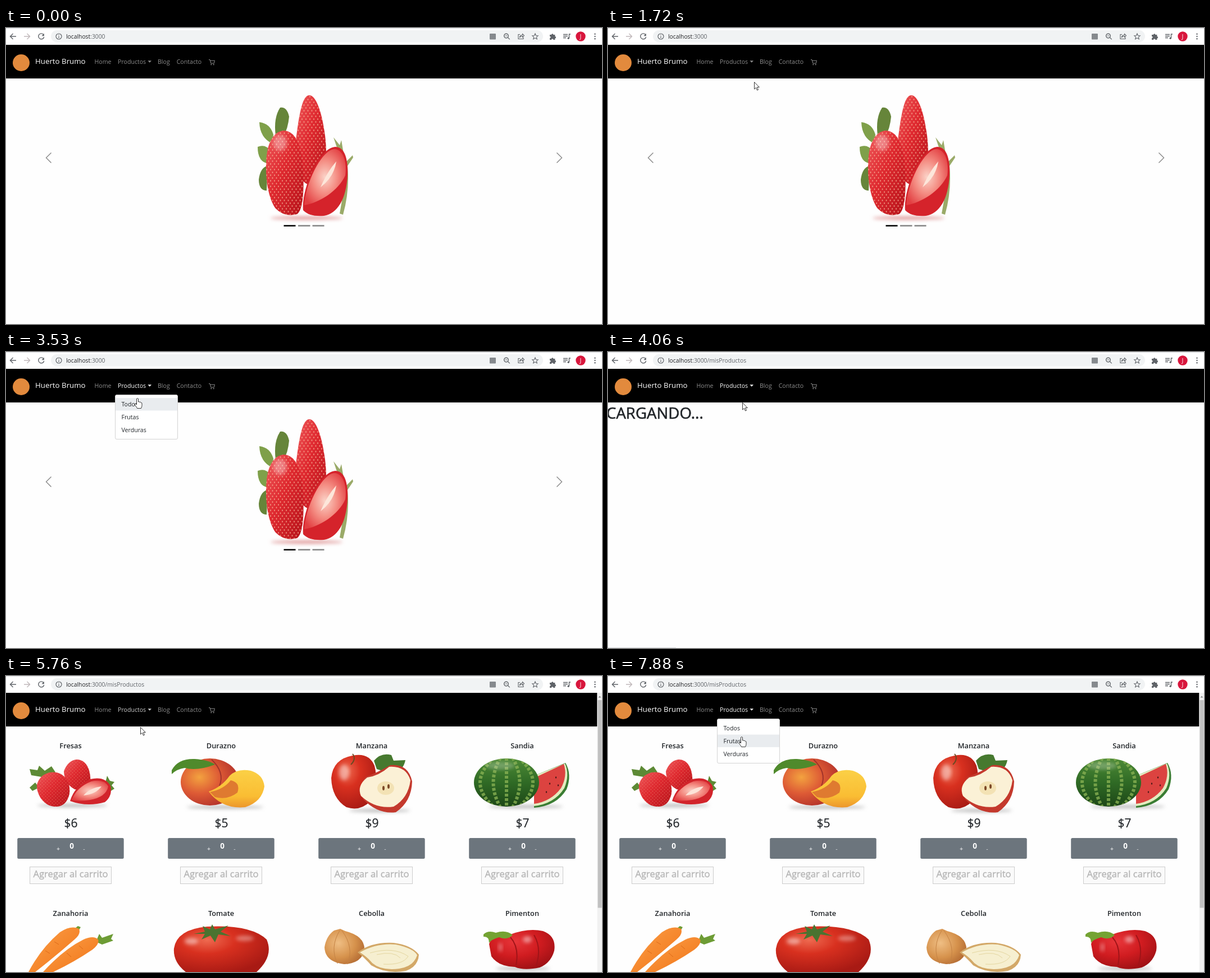
An HTML page that plays this animation: 1061x528 px, repeating every 8000 ms.

```html
<!DOCTYPE html>
<html lang="es">
<head>
<meta charset="utf-8">
<title>Tienda</title>
<style>
html, body { margin: 0; width: 100%; height: 100%; overflow: hidden; background: #fefefe; }
svg { display: block; width: 1061px; height: 528px; }
text { font-family: "Open Sans", "Noto Sans", sans-serif; font-size: 10.6px; }
.mid { text-anchor: middle; }
.url { font-size: 10.3px; }
.nav { fill: #8c8c8c; }
.item { fill: #212529; }
.title { font-size: 12.8px; font-weight: 600; fill: #212529; }
.price { font-size: 21px; fill: #212529; stroke: #212529; stroke-width: .2; }
.add { font-size: 16.6px; fill: #b5b5b5; stroke: #b5b5b5; stroke-width: .35; }
.load { font-size: 27.6px; fill: #212529; stroke: #212529; stroke-width: .6; }
.line { fill: none; stroke: #5f6368; stroke-width: 1.4; }
</style>
</head>
<body>
<svg viewBox="0 0 1061 528">
  <defs>
    <linearGradient id="berry" x2="1" y2="1">
      <stop offset="0" stop-color="#ee5a5c"/><stop offset=".45" stop-color="#df2a30"/><stop offset="1" stop-color="#b5141b"/>
    </linearGradient>
    <radialGradient id="flesh" cx=".5" cy=".5" r=".6">
      <stop offset="0" stop-color="#fbd3c8"/><stop offset=".5" stop-color="#f48c82"/><stop offset="1" stop-color="#e23f42"/>
    </radialGradient>
    <radialGradient id="peach" cx=".32" cy=".4" r=".7">
      <stop offset="0" stop-color="#f3a23f"/><stop offset=".5" stop-color="#dd5a35"/><stop offset="1" stop-color="#b02f2a"/>
    </radialGradient>
    <linearGradient id="slice" x2="0" y2="1">
      <stop offset="0" stop-color="#fbd046"/><stop offset=".7" stop-color="#fabd33"/><stop offset="1" stop-color="#ec962c"/>
    </linearGradient>
    <radialGradient id="red" cx=".35" cy=".3" r=".75">
      <stop offset="0" stop-color="#ee6a50"/><stop offset=".4" stop-color="#d8301f"/><stop offset="1" stop-color="#a81a14"/>
    </radialGradient>
    <radialGradient id="pepper" cx=".4" cy=".3" r=".75">
      <stop offset="0" stop-color="#e8363a"/><stop offset=".5" stop-color="#d01c20"/><stop offset="1" stop-color="#9c1014"/>
    </radialGradient>
    <radialGradient id="onion" cx=".35" cy=".4" r=".7">
      <stop offset="0" stop-color="#efbe84"/><stop offset=".6" stop-color="#d6924c"/><stop offset="1" stop-color="#b46c34"/>
    </radialGradient>
    <linearGradient id="rind" x2="0" y2="1">
      <stop offset="0" stop-color="#4d8a36"/><stop offset=".5" stop-color="#2f6a25"/><stop offset="1" stop-color="#1d4717"/>
    </linearGradient>
    <linearGradient id="carrot" x2="1" y2="1">
      <stop offset="0" stop-color="#fba04a"/><stop offset=".6" stop-color="#f5852a"/><stop offset="1" stop-color="#e46810"/>
    </linearGradient>
    <pattern id="seeds" width="7" height="10" patternUnits="userSpaceOnUse">
      <g fill="#f9b79a" opacity=".75"><ellipse cx="2" cy="2.5" rx=".9" ry="1.6"/><ellipse cx="5.5" cy="7.5" rx=".9" ry="1.6"/></g>
    </pattern>
    <pattern id="dots" width="6" height="6" patternUnits="userSpaceOnUse">
      <g fill="#f2a080" opacity=".6"><circle cx="1.500" cy="1.500" r=".7"/><circle cx="4.500" cy="4.500" r=".7"/></g>
    </pattern>
    <clipPath id="melon"><ellipse cx="891" cy="190" rx="58" ry="43"/></clipPath>
    <filter id="soft" x="-20%" y="-100%" width="140%" height="300%"><feGaussianBlur stdDeviation="3"/></filter>
  </defs>
  <rect width="1061" height="528" fill="#fefefe"/>

  <g id="home"></g>
  <text id="loading" class="load" x="-3" y="118.500">CARGANDO...</text>
  <g id="shop"></g>

  <rect width="1061" height="30" fill="#fff"/>
  <path d="M0 .5H1061" stroke="#dfe1e5"/>
  <rect x="80" y="4" width="876" height="21.500" rx="10.700" fill="#f1f3f4"/>
  <g class="line">
    <path d="M18 15H8M12.500 10L7.500 15l5 5"/>
    <path d="M32 15H42M37.500 10l5 5-5 5" stroke="#c0b8ba"/>
    <path d="M66.500 11.500A5 5 0 1 0 67.700 16"/>
    <circle cx="94" cy="15" r="5" stroke-width="1.200"/><path d="M94 14.500V18M94 11.800v1.300" stroke-width="1.200"/>
    <circle cx="890.500" cy="14" r="3.800"/><path d="M893.500 17l3.300 3.300M888.700 14h3.600" stroke-width="1.200"/>
    <path d="M915 11.500h-3v8h9v-3M914.500 16.500q.5-4 5-4v-2l3 3-3 3v-2q-3 0-5 2Z" stroke-width="1.100"/>
    <path d="M942 10l1.500 3.500 3.700.3-2.800 2.400.9 3.700-3.300-2-3.300 2 .9-3.700-2.800-2.400 3.700-.3Z" stroke-width="1.100"/>
    <path d="M992 11.500h8M992 14.500h8M992 17.500h5M1002.500 18v-7h2.500"/>
  </g>
  <g fill="#5f6368">
    <rect x="861" y="10" width="11" height="10.500" rx="1" fill="#85898d"/>
    <path d="M67.900 9.800v4.500h-4.500z"/>
    <path d="M968 12h3a1.700 1.700 0 0 1 3.400 0h3v3a1.700 1.700 0 0 1 0 3.400v2.600h-3a1.500 1.500 0 0 0-3.300 0H968v-3a1.600 1.600 0 0 0 0-3.200z"/>
    <circle cx="1001.200" cy="18.300" r="1.700"/>
    <circle cx="1048.500" cy="10.800" r="1.200"/><circle cx="1048.500" cy="15" r="1.200"/><circle cx="1048.500" cy="19.200" r="1.200"/>
  </g>
  <circle cx="1023" cy="15" r="8.700" fill="#d8163c"/>
  <text class="mid" x="1023" y="18.500" fill="#fff">J</text>
  <text class="url" x="107" y="18.700" fill="#202124">localhost<tspan fill="#5f6368">:3000<tspan id="path">/misProductos</tspan></tspan></text>

  <rect id="bar" y="30" width="1061" height="60"/>
  <circle cx="27" cy="62" r="15" fill="#e28a3d"/>
  <text x="52" y="64" style="font-size:13.300px" fill="#fff">Huerto Brumo</text>
  <text class="nav" x="157.500" y="64.300">Home</text>
  <g id="products" fill="#fff"><text x="199" y="64.300">Productos</text><path d="M252.500 58.300h6.500l-3.250 3.400z"/></g>
  <text id="blog" class="nav" x="270" y="64.300">Blog</text>
  <text class="nav" x="303.700" y="64.300">Contacto</text>
  <path d="M361 56.500h2l1.800 6.500h5.500l1.200-4.800h-7.800" fill="none" stroke="#8c8c8c"/>
  <circle cx="365.300" cy="65.300" r="1" fill="#8c8c8c"/><circle cx="369.700" cy="65.300" r="1" fill="#8c8c8c"/>

  <g id="scroll">
    <rect x="1052.500" y="30" width="8.500" height="498" fill="#f1f1f1"/>
    <rect x="1053.500" y="43" width="7" height="370.500" fill="#c1c1c1"/>
    <path d="M1054.500 38.500l2.500-3 2.500 3z" fill="#8a8a8a"/>
  </g>

  <g id="menu">
    <rect x="194.500" y="76.500" width="111" height="79" rx="2.500" fill="#fff" stroke="#d3d3d3"/>
    <rect id="mark" x="195" y="82" width="110" height="22.400" fill="#e9ecef"/>
    <text class="item" x="205.500" y="97.300">Todos</text>
    <text class="item" x="205.500" y="120">Frutas</text>
    <text class="item" x="205.500" y="142.700">Verduras</text>
  </g>
  <path id="hint" d="M0 527.500H121" stroke="#dadce0"/>

  <path id="arrow" d="M.5.5V13l3-2.600 2 4.600 2-.9-2-4.500H9.300Z" fill="#fff" stroke="#222" stroke-width=".9"/>
  <path id="hand" d="M-1.500 1.500Q0-.5 1.500 1.500V7Q3 6 4 7.500Q5.500 6.500 6.300 8.300Q8 8 8 10V13.500Q8 15.500 6.500 18.500H-.5Q-1 16.500-3.800 13.500Q-5.500 11-4 10.200Q-2.800 10-1.500 12Z" fill="#fff" stroke="#222" stroke-width=".9"/>
</svg>
<script>
const $ = id => document.getElementById(id);
const shape = (d, fill, extra = '') => `<path d="${d}" fill="${fill}" ${extra}/>`;
const stroke = (d, color, width = 1) => shape(d, 'none', `stroke="${color}" stroke-width="${width}"`);
const oval = (x, y, rx, ry, fill, extra = '') =>
  `<ellipse cx="${x}" cy="${y}" rx="${rx}" ry="${ry}" fill="${fill}" ${extra}/>`;
const shadow = (x, y, rx, color = '#bbb') => oval(x, y, rx, 3, color, 'filter="url(#soft)"');
const shine = (x, y, rx, ry, alpha = .45) => oval(x, y, rx, ry, '#fff', `opacity="${alpha}" filter="url(#soft)"`);
const berry = (d, grain) => shape(d, 'url(#berry)') + shape(d, `url(#${grain})`);

function carousel() {
  return shadow(535, 339, 64, '#e09a9a') +
    shape('M480 192Q476 160 488 142Q500 140 504 158Q502 180 494 192Z', '#66853a') +
    shape('M474 206Q452 196 451 168Q470 170 476 190ZM468 242Q448 240 448 212Q462 206 472 220Z', '#7fa04a') +
    shape('M464 290Q450 290 450 270Q453 248 466 246Z', '#66853a') +
    shape('M606 238L617 227 618 231 608 246Q612 290 600 333L594 331Q604 280 602 240L590 216 583 195 594 209 597 200 600 218Z', '#9aaa68') +
    berry('M540 120C552 120 562 150 567 185C573 225 572 265 540 280C514 272 512 225 518 185C523 150 528 120 540 120Z', 'seeds') +
    berry('M494 183C518 184 527 214 529 255C531 295 528 326 518 332Q496 338 480 322C464 300 459 250 466 215Q474 185 494 183Z', 'seeds') +
    shine(488, 205, 12, 14, .35) +
    shape('M586 212C604 212 609 236 608 262C606 305 590 331 566 335Q540 337 529 325C525 290 556 214 586 212Z', '#d5232b') +
    shape('M585 216C601 217 607 240 604 263C592 290 558 312 531 316C532 280 561 217 585 216Z', 'url(#flesh)') +
    shape('M588 238Q572 256 560 284Q584 266 588 238Z', '#fde6da') +
    stroke('M80.5 222.5l-9 9 9 9M980.5 222.5l9 9-9 9', '#858585', 1.4) +
    shape('M494.5 351.5h21v2.5h-21z', '#000') +
    shape('M520 351.5h21.5v2.5h-21.5zM545.5 351.5h21v2.5h-21z', '#858585');
}

function strawberries() {
  return shadow(118, 231, 62) +
    shape('M42 166l14 2 3-8 10 9 12-8 8 12-20 8-24-4zM52 190l-10 9 5 6 12-6zM177 190l3-12 5 9 8 2-5 6 5 6-8 5z', '#5d8a35') +
    berry('M125 149C144 148 152 170 150 192Q140 206 122 202Q104 192 103 170Q110 151 125 149Z', 'dots') +
    berry('M78 172C100 168 116 186 113 210Q108 232 90 233C68 234 54 212 55 194Q60 176 78 172Z', 'dots') +
    shape('M114 223Q122 196 150 184Q176 178 186 196Q190 214 176 225Q145 234 114 223Z', '#d2242b') +
    shape('M117 221Q126 198 152 188Q175 183 182 197Q178 216 150 221Q130 224 117 221Z', 'url(#flesh)') +
    shape('M138 213Q150 199 170 197Q160 211 138 213Z', '#fde3d8');
}

function peach() {
  return shadow(390, 234, 68) + oval(363, 189, 52, 42, 'url(#peach)') +
    stroke('M366 149Q390 172 380 196', '#a2342a', 2) +
    shape('M295 168Q306 147 336 148Q362 150 372 158Q340 170 318 164Q304 166 295 175Z', '#4f8a2c') +
    shape('M361 206Q384 198 398 178Q412 164 436 169Q458 176 460 197Q456 224 426 234Q384 238 361 206Z', 'url(#slice)') +
    shape('M363 207Q388 202 400 186Q418 190 412 208Q394 222 372 216Z', '#df7a30');
}

function apple() {
  return shadow(665, 240, 54) +
    shape('M655 151Q668 136 686 141L690 151 711 150Q708 166 692 176L660 166Z', '#46792f') +
    shape('M617 142Q646 136 656 160Q664 190 648 224Q630 242 606 234Q580 218 579 182Q582 148 617 142Z', 'url(#red)') +
    shine(602, 172, 9, 14) +
    stroke('M614 158Q624 148 617 139', '#6b4a22', 2) +
    shape('M684 159Q716 156 723 188Q722 224 694 243Q662 247 636 220Q624 200 640 180Q662 172 684 159Z', '#c4392d') +
    shape('M682 162Q712 160 720 186Q716 218 690 233Q658 238 632 214Q624 196 643 181Q664 178 682 162Z', '#fbf1d6') +
    oval(676, 200, 15, 12, '#f3e2b4') + oval(672, 200, 2, 4, '#7d4a28') + oval(681, 197, 2, 4, '#7d4a28');
}

function watermelon() {
  let out = shadow(925, 233, 66) +
    shape('M940 178L996 155Q1008 176 998 202Q980 232 940 235Z', '#3a7d33') +
    shape('M940 178L995 156Q1004 176 994 200Q976 228 940 232Z', '#e3ecc0') +
    shape('M940 182L993 157Q1000 178 988 200Q970 224 940 228Z', '#dc4340') +
    oval(891, 190, 58, 43, 'url(#rind)') + '<g clip-path="url(#melon)">';
  for (let i = -3; i <= 3; i++) {
    const path = `M${891 + i * 11} 146Q${891 + i * 36} 190 ${891 + i * 11} 234`;
    out += shape(path, 'none', 'stroke="#86b052" stroke-width="6" stroke-dasharray="5 3" opacity=".8"');
  }
  return out + shine(880, 160, 26, 7, .25) + '</g>' +
    [[968, 192], [979, 181], [962, 207], [983, 195]].map(([x, y]) => oval(x, y, 1.2, 1.8, '#4a1a18')).join('');
}

function carrots() {
  return shape('M114 457l14-11 5 2-6 10zM160 474l6-14 5 7 20-7-4 9 4 3-20 7z', '#6d9c35') +
    shape('M40 528Q62 486 96 457Q116 444 130 451Q134 460 122 470Q88 500 52 528Z', 'url(#carrot)') +
    shape('M66 528Q102 488 138 470Q156 462 164 470Q167 478 154 488Q122 510 84 528Z', 'url(#carrot)') +
    stroke('M86 474l8 5M70 490l8 5M130 481l7 6M108 494l8 7', '#dc6a18');
}

function tomato() {
  return shape('M299 486Q304 452 358 447Q436 443 464 470Q477 500 446 528H320Q297 510 299 486Z', 'url(#red)') +
    shine(330, 473, 12, 6) + shine(425, 468, 16, 5, .35) +
    shape('M334 460l20-4-4-10 13 6 4-9 5 9 24-7-14 11 18 8-22-3-6 14-8-12-16 7 6-10z', '#4a7330');
}

function onion() {
  return shape('M584 454l11-3 9 4Q640 464 638 490Q632 513 602 514Q568 510 567 484Q570 464 584 454Z', 'url(#onion)') +
    stroke('M594 454Q576 484 590 513M598 454Q620 484 608 514', '#c48244') +
    shape('M626 493Q650 474 690 476Q722 480 735 497Q734 518 712 526Q676 532 650 516Q638 502 626 493Z', '#d3a868') +
    shape('M630 493Q660 476 694 479Q726 486 732 498Q726 518 700 522Q668 526 652 512Q642 500 630 493Z', '#f6efd0') +
    stroke('M648 494Q690 482 716 500Q706 516 672 514M660 497Q690 490 702 503', '#e4d6a0');
}

function pepper() {
  return shadow(920, 522, 48) +
    shape('M860 478Q868 456 898 461Q930 449 956 455Q980 464 976 490Q970 512 950 520Q922 526 906 519Q876 518 864 500Z', 'url(#pepper)') +
    stroke('M898 466Q914 484 908 516M940 462Q954 486 944 516', '#a01418', 2) +
    shine(928, 470, 8, 6) + shine(880, 484, 4, 8, .3) +
    shape('M850 461Q858 453 872 458Q890 452 902 462Q892 472 878 466Q864 470 860 476Q860 464 850 465Z', '#74a333');
}

function card([name, price, draw], i) {
  const x = 115 + 268 * (i % 4), low = i > 3;
  const head = `<text class="title mid" x="${x}" y="${low ? 427.5 : 129}">${name}</text>${draw()}`;
  if (low) return head;
  return head + `<text class="price mid" x="${x + .5}" y="270">$${price}</text>
    <rect x="${x - 94.8}" y="289" width="189.5" height="37" rx="2.5" fill="#6c757d"/>
    <g fill="#fff"><text class="mid" x="${x - 22}" y="312">+</text>
    <text class="mid" x="${x + 2}" y="307.5" style="font-size:13.5px;font-weight:700">0</text>
    <text class="mid" x="${x + 24}" y="312" opacity=".75">-</text></g>
    <rect x="${x - 72.5}" y="340.5" width="145" height="30" fill="#fafafa" stroke="#ccc"/>
    <text class="add mid" x="${x}" y="358.7">Agregar al carrito</text>`;
}

$('home').innerHTML = carousel();
$('shop').innerHTML = [
  ['Fresas', 6, strawberries], ['Durazno', 5, peach], ['Manzana', 9, apple], ['Sandia', 7, watermelon],
  ['Zanahoria', 0, carrots], ['Tomate', 0, tomato], ['Cebolla', 0, onion], ['Pimenton', 0, pepper]
].map(card).join('');

// time, x, y, steps taken to get there
const moves = [
  [0, -50, -50, 1], [330, 941, 497, 1], [730, 292, 395, 6], [1020, 292, 395, 1],
  [1720, 260, 96, 9], [1840, 284, 95, 1], [2000, 284, 95, 1], [2300, 245, 66, 5],
  [2480, 277, 70, 3], [2660, 258, 68, 1], [2760, 242, 66, 1], [3290, 242, 66, 1],
  [3530, 234, 82, 4], [3640, 234, 82, 1], [3860, 239, 90, 3], [5080, 239, 91, 1],
  [6470, 242, 72, 1], [6550, 242, 59, 1], [6750, 244, 58, 1], [6800, 246, 57, 1],
  [7410, 246, 57, 1], [7660, 242, 107, 4], [7810, 240, 108, 1], [7880, 238, 108, 1]
];
const glow = [[0, .55], [2240, .75], [2400, .55], [2660, .75], [3200, 1], [4330, .8], [7400, 1]];

const during = (t, a, b) => t >= a && t < b;
const show = (id, on) => $(id).setAttribute('visibility', on ? 'visible' : 'hidden');

function pointer(t) {
  const i = moves.findLastIndex(m => m[0] <= t);
  const [t0, x, y] = moves[i], next = moves[i + 1];
  if (!next) return [x, y];
  const [t1, nx, ny, n] = next;
  const f = Math.floor((t - t0) / (t1 - t0) * n) / n;
  return [x + (nx - x) * f, y + (ny - y) * f];
}

function draw(now) {
  const t = now % 8000;
  const [x, y] = pointer(t).map(Math.round);
  const open = during(t, 3200, 4010) || t >= 7300;
  const shop = t >= 5760;
  const hand = during(t, 2240, 4010) || t >= 6470;

  show('home', t < 4010);
  show('loading', during(t, 4010, 5760));
  show('shop', shop);
  show('scroll', shop);
  show('path', t >= 4010);
  show('menu', open);
  show('mark', open && y >= 82);
  show('hint', during(t, 3860, 4530));
  show('arrow', t >= 330 && !hand);
  show('hand', hand);
  $('bar').setAttribute('width', shop ? 1052.5 : 1061);
  $('mark').setAttribute('y', y < 104 ? 82 : 104.5);
  $('products').setAttribute('fill-opacity', glow.findLast(g => g[0] <= t)[1]);
  $('blog').style.fill = during(t, 2420, 2660) ? '#bfbfbf' : '';
  for (const id of ['arrow', 'hand']) $(id).setAttribute('transform', `translate(${x} ${y})`);
}

const start = performance.now();
function tick() {
  draw(performance.now() - start);
  requestAnimationFrame(tick);
}
tick();
</script>
</body>
</html>
```
